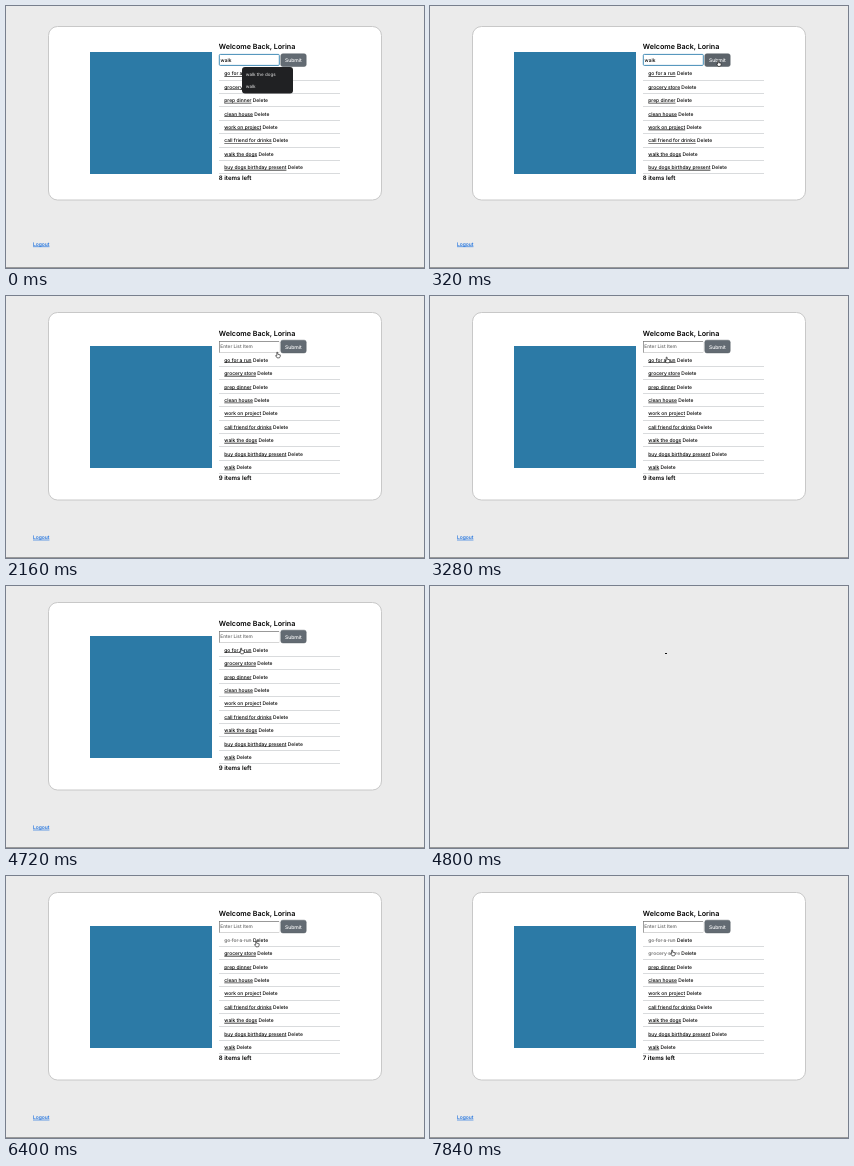
Recreate the animation shown at these times as an HTML page with a canvas. Size 418x262 px, loop 8 s.

```html
<!DOCTYPE html>
<html lang="en">
<head>
<meta charset="utf-8">
<title>List page</title>
<style>
html, body { margin: 0; width: 100%; height: 100%; overflow: hidden; background: #ebebeb; }
canvas { display: block; width: 418px; height: 262px; }
</style>
</head>
<body>
<canvas></canvas>
<script>
const LOOP = 8000, STEP = 80;
const SUBMIT = 800, BLANK = 4800, FIRST_DONE = 4880, SECOND_DONE = 7600;
const ROW_HEIGHT = 13.4;
const ITEMS = ['go for a run', 'grocery store', 'prep dinner', 'clean house', 'work on project',
  'call friend for drinks', 'walk the dogs', 'buy dogs birthday present', 'walk'];

// Pointer path: [time, x, y]
const PATH = [[80, 281, 68], [320, 289, 57.5], [1840, 289, 57.5], [2640, 241, 62],
  [3280, 237.5, 64], [3440, 236, 65], [5600, 236, 65], [6400, 251, 68],
  [7280, 242, 78], [7600, 243, 77]];

const canvas = document.querySelector('canvas');
const scale = window.devicePixelRatio || 1;
canvas.width = 418 * scale;
canvas.height = 262 * scale;
const ctx = canvas.getContext('2d');
ctx.scale(scale, scale);
ctx.textRendering = 'geometricPrecision';

function rect(x, y, w, h, fill, radius = 0, stroke, line = 1) {
  ctx.beginPath();
  ctx.roundRect(x, y, w, h, radius);
  ctx.fillStyle = fill;
  ctx.fill();
  if (!stroke) return;
  ctx.strokeStyle = stroke;
  ctx.lineWidth = line;
  ctx.stroke();
}

function text(str, x, y, size, color = '#000', weight = 500) {
  ctx.font = `${weight} ${size}px Inter, sans-serif`;
  ctx.fillStyle = color;
  ctx.fillText(str, x, y);
  return ctx.measureText(str).width;
}

function link(str, x, y, color) {
  const width = text(str, x, y, 4.95, color);
  rect(x, y + 0.7, width, 0.6, color);
  return width;
}

function drawItem(label, y, done) {
  const width = done ? text(label, 218.3, y, 4.95, '#6c6c6c') : link(label, 218.3, y, '#000');
  if (done) rect(218.3, y - 1.7, width, 0.4, '#aaa');
  text(' Delete', 218.3 + width, y, 4.95);
}

function drawInput(submitted) {
  if (!submitted) {
    rect(213.3, 48.4, 60, 11, '#fff', 1, '#2f7fae', 0.9);
    text('walk', 214.6, 55.7, 4.9);
    return;
  }
  rect(213, 45, 60.5, 12, '#e6e6e6');
  rect(213, 45, 60, 11.5, '#777');
  rect(213.7, 45.8, 59.3, 10.7, '#fff');
  text('Enter List Item', 214.3, 52.2, 4.75, '#666');
}

function drawSuggestions() {
  rect(236, 61, 51, 26.5, '#202123', 3);
  text('walk the dogs', 239.7, 70.3, 4.5, '#c8c8c8');
  text('walk', 239.7, 81.8, 4.5, '#c8c8c8');
}

function pointerAt(t) {
  const next = PATH.findIndex(p => p[0] > t);
  if (next < 0) return PATH.at(-1).slice(1);
  const [t0, x0, y0] = PATH[next - 1], [t1, x1, y1] = PATH[next];
  const k = (t - t0) / (t1 - t0), ease = k * k * (3 - 2 * k);
  return [x0 + (x1 - x0) * ease, y0 + (y1 - y0) * ease];
}

function drawHand(x, y) {
  ctx.save();
  ctx.translate(x, y);
  ctx.beginPath();
  ctx.moveTo(-1.3, -2.8);
  for (const [px, py] of [[-0.4, -2.8], [-0.3, -0.8], [2.2, -0.2], [2.1, 1.4], [1.3, 2.8],
    [-1, 2.8], [-2.5, 0.6], [-1.3, 0.6]]) ctx.lineTo(px, py);
  ctx.closePath();
  ctx.fillStyle = '#fff';
  ctx.fill();
  ctx.strokeStyle = '#111';
  ctx.lineWidth = 0.6;
  ctx.lineJoin = 'round';
  ctx.stroke();
  ctx.restore();
}

function drawPage(t) {
  const submitted = t >= SUBMIT;
  const top = submitted ? -3.6 : 0;
  const items = submitted ? ITEMS : ITEMS.slice(0, -1);
  const done = (t >= FIRST_DONE) + (t >= SECOND_DONE);
  const hover = t >= 160 && t < 2000;

  rect(42.5, submitted ? 16.5 : 20.5, 333, submitted ? 187.5 : 173.5, '#fff', 9, '#c8c8c8');
  rect(84, submitted ? 50 : 46, 122, 122, '#2c7aa6');
  text('Welcome Back, Lorina', 212.8, 43.2 + top, 7.15, '#000', 600);

  drawInput(submitted);
  rect(274.8, 47.8 + top, 25.4, 12.7, hover ? '#5c636a' : '#636b73', 2, '#575e65', 0.5);
  text('Submit', 278.9, 56.1 + top, 5.05, '#fff');

  items.forEach((label, i) => {
    const y = 69.3 + top + i * ROW_HEIGHT;
    drawItem(label, y, i < done);
    rect(213, Math.floor(y + 4.8), 121, 1, '#d9dbdd');
  });
  const count = items.length - done;
  text(`${count} items left`, 212.8, submitted ? 184.1 : 173.9, 6.1, '#000', 600);
  link('Logout', 27, submitted ? 243 : 239.8, '#0b66dd');

  if (t < 80) drawSuggestions();
  else drawHand(...pointerAt(t));
}

function draw(now) {
  const t = Math.floor((now % LOOP) / STEP) * STEP;
  rect(0, 0, 418, 262, '#ebebeb');
  if (t === BLANK) rect(235, 67, 2, 1, '#111');
  else drawPage(t);
  rect(0, 261, 418, 1, '#999');
}

const start = performance.now();
function tick() {
  draw(performance.now() - start);
  requestAnimationFrame(tick);
}
tick();
</script>
</body>
</html>
```
